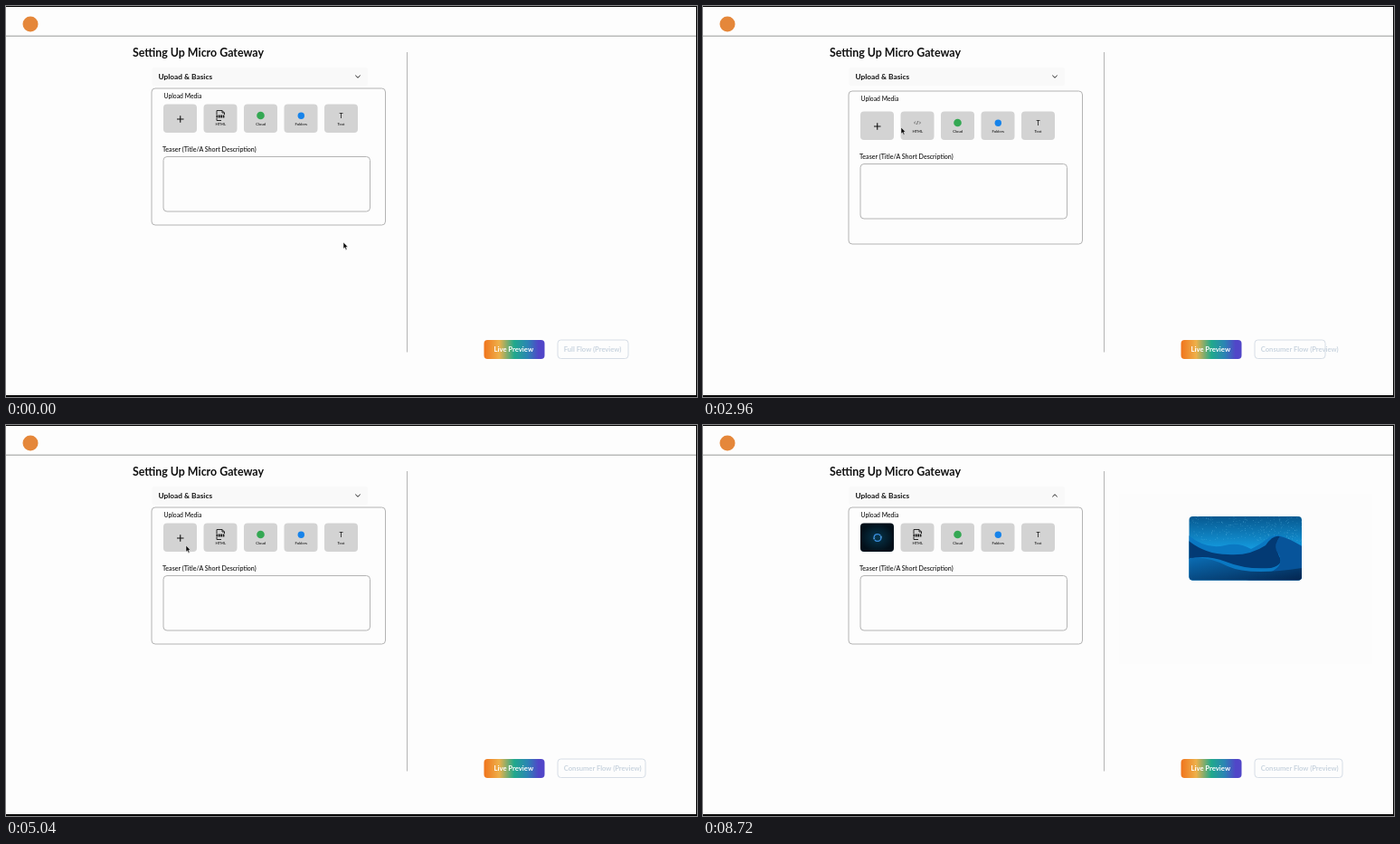
Animation, 764 px wide and 432 px high, one loop 8800 ms. Source, as an HTML page:

```html
<!DOCTYPE html>
<html lang="en">
<head>
<meta charset="utf-8">
<title>Gateway setup</title>
<style>
  html, body { margin: 0; width: 100%; height: 100%; overflow: hidden; background: #fdfdfd; }
  svg { display: block; width: 764px; height: 432px; }
  text { font-family: Lato, sans-serif; font-weight: 500; fill: #111; }
  .bold { font-weight: 700; }
  .tiny { font-size: 4.2px; text-anchor: middle; }
  .line { fill: none; stroke: #b4b4b4; }
</style>
</head>
<body>
<svg viewBox="0 0 764 432">
  <defs>
    <linearGradient id="rainbow">
      <stop offset="0" stop-color="#f0741c"/><stop offset=".25" stop-color="#eeb04a"/>
      <stop offset=".5" stop-color="#20a98c"/><stop offset=".72" stop-color="#2b84b4"/>
      <stop offset=".9" stop-color="#5146c8"/>
    </linearGradient>
    <linearGradient id="dusk" x2="0" y2="1">
      <stop offset="0" stop-color="#b84e0b"/><stop offset=".45" stop-color="#f58a1c"/>
    </linearGradient>
    <radialGradient id="glow">
      <stop offset="0" stop-color="#fffbe0"/><stop offset=".2" stop-color="#ffe27a"/>
      <stop offset="1" stop-color="#ffa52a" stop-opacity="0"/>
    </radialGradient>
    <linearGradient id="sand" x2="0" y2="1">
      <stop offset="0" stop-color="#b3530f"/><stop offset="1" stop-color="#642806"/>
    </linearGradient>
    <linearGradient id="night" x2="0" y2="1">
      <stop offset="0" stop-color="#07588f"/><stop offset=".5" stop-color="#149ade"/>
    </linearGradient>
    <linearGradient id="dune" x2="1" y2="1">
      <stop offset="0" stop-color="#0b6db4"/><stop offset="1" stop-color="#03254f"/>
    </linearGradient>
    <radialGradient id="deep">
      <stop offset="0" stop-color="#06364d"/><stop offset="1" stop-color="#03101a"/>
    </radialGradient>
    <clipPath id="frame"><rect x="537.5" y="101" width="124.5" height="70.5" rx="4"/></clipPath>
  </defs>

  <rect width="764" height="432" fill="#fdfdfd"/>
  <path d="M0 33.2H764" stroke="#b9bbba" stroke-width="1.5"/>
  <path d="M443.5 51V382.5" stroke="#b4b4b4"/>
  <circle cx="27" cy="20" r="8.5" fill="#e5873a"/>
  <text class="bold" x="140" y="55.5" font-size="12.4">Setting Up Micro Gateway</text>

  <rect x="161.500" y="68" width="238.500" height="20" rx="2" fill="#f9f9f9"/>
  <text class="bold" x="168.5" y="81" font-size="8.3">Upload &amp; Basics</text>
  <path id="chevron" d="M-2.7 -1.3L0 1.3L2.7 -1.3" fill="none" stroke="#222"/>

  <rect id="panel" class="line" x="161" width="258.500" rx="4"/>
  <text id="mediaLabel" x="174.5" font-size="6.8">Upload Media</text>
  <g id="fields">
    <g id="tiles" fill="#d3d3d3"></g>
    <path id="plus" d="M189 125H196.500M192.750 121.300V128.700" stroke="#111" stroke-width="1.100"/>
    <g id="loader">
      <rect x="174" y="108.500" width="37" height="31.500" rx="4" fill="url(#deep)"/>
      <circle cx="193" cy="124.500" r="3.900" fill="none" stroke="#3b8fe0" stroke-width="1.400" stroke-dasharray="9.500 2.700"/>
      <path d="M188 124.500H190.500L189 127ZM198 124.500H195.500L197 122Z" fill="#5aa8f0"/>
    </g>
    <g id="page" fill="none" stroke="#151515" stroke-width=".9">
      <path d="M233 120V115.500H239L241.500 118V120M233 124V126.500H238M239 115.500V118H241.500"/>
      <path d="M232.500 122H242" stroke-width="2.800" stroke-dasharray="1.700 .7"/>
    </g>
    <path id="code" d="M235 119.500L233.500 121L235 122.500M239 119.500L240.500 121L239 122.500M237.700 119L236.300 123" fill="none" stroke="#333" stroke-width=".6"/>
    <circle cx="281.500" cy="121" r="4.300" fill="#34a853"/>
    <circle cx="326.300" cy="121.300" r="3.700" fill="#1683ea"/>
    <text x="370.500" y="124" font-size="7" text-anchor="middle">T</text>
    <g class="labels">
      <text class="tiny" x="237.300" y="132">HTML</text>
      <text class="tiny" x="281.700" y="132">Cloud</text>
      <text class="tiny" x="326.300" y="132">Folders</text>
      <text class="tiny" x="370.500" y="132">Text</text>
    </g>
    <text x="173" y="161.300" font-size="7.100">Teaser (Title/A Short Description)</text>
    <rect class="line" x="174" y="166.500" width="228.500" height="60.500" rx="4"/>
  </g>

  <g id="audio">
    <rect x="460" y="104" width="280" height="166" fill="#fcfcfc"/>
    <rect x="475" y="110" width="242" height="107" fill="#f9f9f9"/>
    <path id="wave" stroke="#747474" stroke-width="1.500"/>
    <circle cx="598.500" cy="171" r="10" fill="#050505"/>
    <path d="M596.200 166.800L602.300 171L596.200 175.200Z" fill="#fff"/>
    <g fill="none" stroke="#111" stroke-width=".9">
      <circle cx="573.300" cy="172.500" r="5"/><circle cx="626.500" cy="172.500" r="5"/>
      <path d="M574 165.800L572 167.500L574 169M625.800 165.800L627.800 167.500L625.800 169"/>
    </g>
    <text class="bold" x="573.300" y="175" font-size="6" text-anchor="middle">10</text>
    <text class="bold" x="626.500" y="175" font-size="6" text-anchor="middle">10</text>
  </g>

  <g id="video">
    <rect x="460" y="76" width="280" height="168" fill="#fcfcfc"/>
    <rect x="475" y="84.500" width="242" height="107.500" fill="#f9f9f9"/>
    <g clip-path="url(#frame)">
      <rect x="537" y="101" width="126" height="71" fill="url(#dusk)"/>
      <circle cx="614" cy="132" r="27" fill="url(#glow)"/>
      <path d="M537 134Q555 132 575 136T614 134T662 135V172H537Z" fill="url(#sand)"/>
      <path d="M537 152Q562 139 584 145Q610 153 632 144Q648 137 662 141V146Q640 149 622 158Q590 150 537 163Z" fill="#cc661a" opacity=".6"/>
      <path d="M537 165Q575 148 606 157Q632 162 662 150V172H537Z" fill="#6c2c07" opacity=".7"/>
      <path d="M543 163.700L546 165.500L543 167.300Z" fill="#fff"/>
      <path d="M548 165.600H654.500" stroke="#f3e2d5" stroke-width="1.800" stroke-linecap="round"/>
    </g>
  </g>

  <g id="photo">
    <rect x="460" y="76.500" width="280" height="187" fill="#fcfcfc"/>
    <g clip-path="url(#frame)">
      <rect x="537" y="101" width="126" height="71" fill="url(#night)"/>
      <path id="stars" fill="#7fd0f5" opacity=".55"/>
      <path d="M537 122Q556 138 577 133Q592 129 606 137Q618 131 626 124Q637 118 647 127L662 133V172H537Z" fill="#0a78c2"/>
      <path d="M537 128Q556 143 580 143Q604 145 622 133Q630 121 638 123Q631 133 637 145Q643 154 628 158Q600 160 578 151Q556 143 537 148Z" fill="#033a74"/>
      <path d="M638 123Q648 125 662 134V172H600Q634 164 638 153Q640 146 634 139Q631 132 638 123Z" fill="#07549a"/>
      <path d="M537 147Q560 145 580 156Q604 167 662 158V172H537Z" fill="url(#dune)"/>
    </g>
  </g>

  <rect x="528.500" y="369" width="67" height="21" rx="4" fill="url(#rainbow)"/>
  <text class="bold" x="539.500" y="382" font-size="7.700" style="fill:#fff">Live Preview</text>
  <rect id="flowButton" x="610" y="369" height="20.500" rx="3.500" fill="none" stroke="#d6dde6"/>
  <text id="flowText" class="bold" x="616.800" y="382" font-size="7.600" style="fill:#c9d4df"></text>

  <path id="cursor" d="M0 0V7.200L1.600 5.800L2.800 8.500L4 8L2.900 5.300H5Z" fill="#0a0a0a" stroke="#fff" stroke-width=".5"/>
  <path d="M0 .5H764M763.500 0V432" stroke="#000"/>
  <path d="M0 431H764" stroke="#000" stroke-width="2"/>
</svg>
<script>
const LOOP = 8800;
const FADE = 120;
const $ = id => document.getElementById(id);
const set = (id, attrs) => {
  for (const name in attrs) $(id).setAttribute(name, attrs[name]);
};

// When each preview is on screen
const previews = { audio: [1000, 2400], video: [3400, 4520], photo: [5160, LOOP] };

// Pointer stops: time, x, y
const stops = [
  [0, 373, 261], [320, 373, 261], [720, 193, 126], [960, 187, 121], [1280, 187, 121],
  [2080, 321, 313], [2320, 321, 313], [2560, 373, 261], [2760, 373, 261],
  [2960, 219, 134], [3120, 196, 128], [3680, 196, 128], [4240, 321, 313],
  [4480, 321, 313], [4960, 199, 133], [5600, 199, 133], [5840, 199, 133],
  [6720, 313, 312], [LOOP, 313, 312]
];

let tiles = '';
for (let i = 0; i < 5; i++) {
  tiles += `<rect x="${174 + 44.5 * i}" y="108.500" width="37" height="31.500" rx="4"/>`;
}
$('tiles').innerHTML = tiles;

const heights = [6, 14, 8, 13, 20, 15, 8];
let wave = '';
for (let i = 0; i < 48; i++) {
  const h = heights[i % 7];
  wave += `M${528 + 3.05 * i} ${136 - h / 2}v${h}`;
}
set('wave', { d: wave });

let seed = 7;
const random = () => (seed = seed * 16807 % 2147483647) / 2147483647;
let stars = '';
for (let i = 0; i < 260; i++) {
  stars += `M${537 + random() * 125} ${101 + random() * 27}h.6v.6h-.6z`;
}
set('stars', { d: stars });

const clamp = v => Math.max(0, Math.min(1, v));

function pointerAt(t) {
  const i = stops.findIndex(s => s[0] > t);
  const [t0, x0, y0] = stops[i - 1], [t1, x1, y1] = stops[i];
  const p = (t - t0) / (t1 - t0), e = p * p * (3 - 2 * p);
  return [x0 + (x1 - x0) * e, y0 + (y1 - y0) * e];
}

function draw(now) {
  const t = now % LOOP;
  let loaded = false;
  for (const id in previews) {
    const [start, end] = previews[id];
    if (t >= start && t < end) loaded = true;
    const fadeOut = end === LOOP ? 1 : clamp((end + FADE - t) / FADE);
    set(id, { opacity: Math.min(clamp((t - start) / FADE), fadeOut) });
  }
  const tall = t >= 2400 && t < 3400;

  set('chevron', { transform: `translate(389 78) scale(1 ${loaded ? -1 : 1})` });
  set('panel', { y: tall ? 94 : 91, height: tall ? 169 : 151 });
  set('mediaLabel', { y: tall ? 105 : 102 });
  set('fields', { transform: `translate(0 ${tall ? 8 : 0})` });
  set('loader', { opacity: +loaded });
  set('page', { opacity: +!tall });
  set('code', { opacity: +tall });
  set('flowButton', { width: t < 4560 ? 78 : 97 });
  $('flowText').textContent = `${t < 2400 ? 'Full' : 'Consumer'} Flow (Preview)`;
  set('cursor', { transform: `translate(${pointerAt(t)})`, opacity: +(t < 8000) });
  requestAnimationFrame(draw);
}
draw(0);
</script>
</body>
</html>
```
